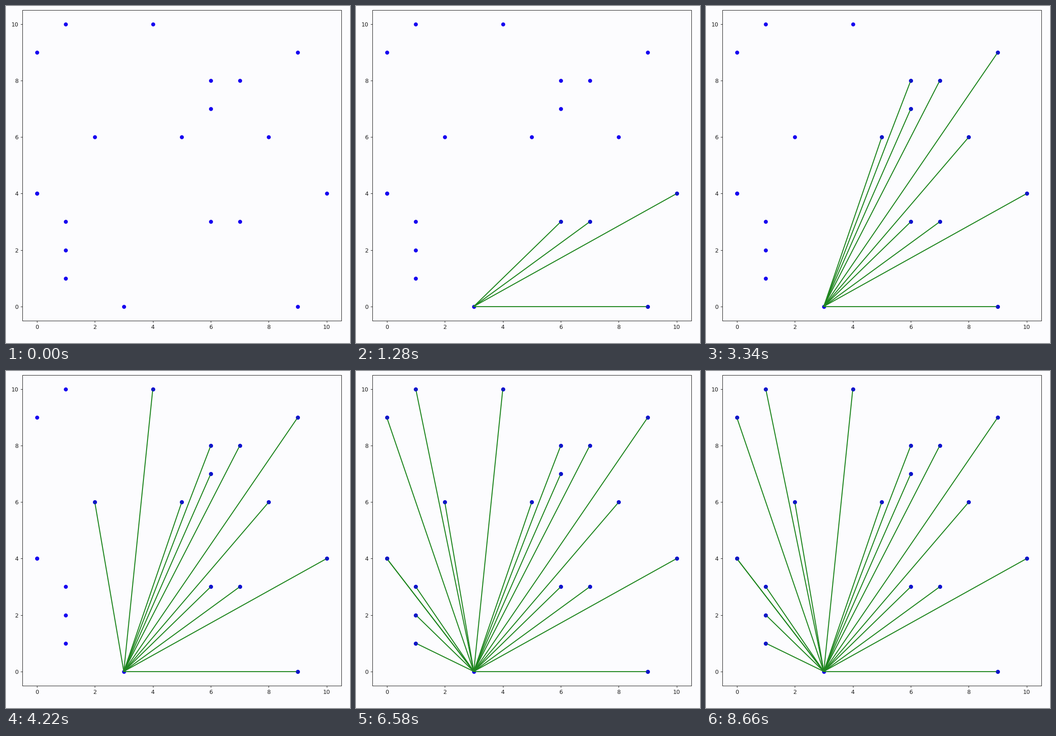
Animation of 756x741 px, one loop 8.76 s. Source, as a matplotlib script:

```python
import math

import matplotlib.pyplot as plt
from matplotlib.animation import FuncAnimation

W, H, DPI = 756, 741, 64
PT = 1.256 * 72 / DPI              # default sizes, enlarged with the plot
LOOP, STEP = 8760, 40              # ms
FIRST, GAP = 172, 344              # first ray and time between rays, ms

BACK, INK = "#fcfcfe", "#1c1c1c"
BLUE, GREEN = "#1602f0", "#1f861f"
REACHED = (0.04, 0.08, 0.78, 0.75)
DOT = 7 * PT

# Heights of the points in each column x = 0, 1, 2, ...
COLUMNS = [(4, 4, 9), (1, 2, 3, 10), (6,), (0,), (10,), (6,),
           (3, 7, 8), (3, 8), (6,), (0, 9), (4,)]


def angle(point):
    return math.atan2(point[1] - origin[1], point[0] - origin[0])


def make_axes(fig):
    left, right, top, bottom = 35.9, 736.6, 9.2, 691.6
    ax = fig.add_axes([left / W, 1 - bottom / H,
                       (right - left) / W, (bottom - top) / H])
    ax.set(xlim=(-0.5, 10.5), ylim=(-0.5, 10.5), facecolor=BACK,
           xticks=range(0, 11, 2), yticks=range(0, 11, 2))
    ax.tick_params(length=3.5 * PT, width=0.8 * PT, pad=3.5 * PT,
                   labelsize=10 * PT, color=INK, labelcolor=INK)
    for spine in ax.spines.values():
        spine.set(linewidth=0.8 * PT, edgecolor=INK)
    return ax


def make_ray(point):
    """A hidden line that ends in a darker dot laid over its point."""
    ray, = ax.plot(*zip(origin, point), color=GREEN, lw=1.7 * PT, marker="o",
                   markevery=[1], ms=DOT, mfc=REACHED, mew=0, zorder=3,
                   visible=False)
    return ray


points = [(x, y) for x, column in enumerate(COLUMNS) for y in column]
origin = min(points, key=lambda p: (p[1], p[0]))
targets = sorted((p for p in points if p != origin), key=angle)

plt.rcParams["font.family"] = "DejaVu Sans"
fig = plt.figure(figsize=(W / DPI, H / DPI), dpi=DPI, facecolor=BACK)
ax = make_axes(fig)
ax.plot(*zip(*points), "o", color=BLUE, ms=DOT, mew=0, zorder=2)
rays = [make_ray(point) for point in targets]


def update(frame):
    now = frame * STEP
    for i, ray in enumerate(rays):
        ray.set_visible(now >= FIRST + i * GAP)
    return rays


anim = FuncAnimation(fig, update, frames=LOOP // STEP, interval=STEP,
                     repeat=True, repeat_delay=0, blit=False)
plt.show()
```
